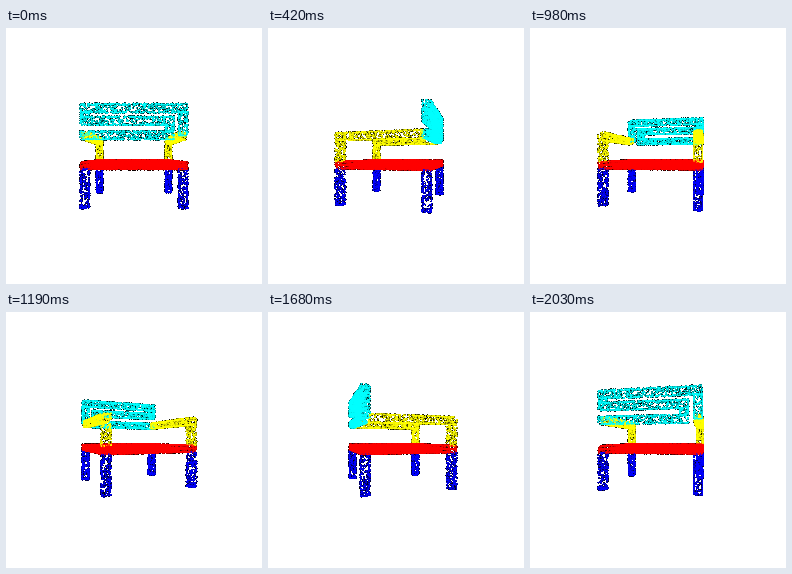
Write a matplotlib script that moves like this. It is 256x256 px and loops after 2100 ms.

```python
import numpy as np
import matplotlib.pyplot as plt
from matplotlib.animation import FuncAnimation

SIZE, FRAMES, INTERVAL = 256, 30, 70
CAMERA = 218.0      # distance to the axis of rotation, in pixels
RADIUS = 1.1        # splat radius
POINTS = 11500

BLUE, RED, YELLOW, CYAN = (0, 0, 1), (1, 0, 0), (1, 1, 0), (0, 1, 1)
HALF_W, HALF_D, HALF_H = 43.8, 41.5, 42.7
T = 3.3             # half thickness of the tube
LEG_X, LEG_Z = HALF_W - T, HALF_D - T
TOP, MID, LOW = -HALF_H + T, -29.0, -17.0
INNER = 29.5
SEAT_TOP, SEAT_MID, SEAT_LOW = 4.9, 7.9, 11.0

rng = np.random.default_rng(7)


def around(c):
    return c - T, c + T


def chair_boxes():
    """Yield (color, x range, y range, z range); y points down."""
    for y in ((SEAT_TOP, SEAT_MID), (SEAT_MID, SEAT_LOW)):
        yield RED, (-HALF_W, HALF_W), y, (-HALF_D, HALF_D)
    for side in (-1, 1):
        x = around(side * LEG_X)
        for z in (-LEG_Z, LEG_Z):
            yield BLUE, x, (SEAT_LOW, HALF_H), around(z)
        yield YELLOW, x, (LOW + T, SEAT_TOP), around(-LEG_Z)
        yield YELLOW, x, around(LOW), (-HALF_D, LEG_Z - T)
    # backrest: one tube folded into a spiral
    z = around(LEG_Z)
    yield CYAN, (-HALF_W, HALF_W), around(TOP), z
    yield CYAN, (-HALF_W, INNER + T), around(MID), z
    yield CYAN, (-HALF_W, INNER + T), around(LOW), z
    yield CYAN, around(LEG_X), (TOP + T, LOW), z
    yield CYAN, around(-LEG_X), (TOP + T, MID - T), z
    yield CYAN, around(INNER), (MID + T, LOW - T), z


def face_areas(lo, hi):
    a, b, c = hi - lo
    return np.array([b * c, a * c, a * b])


def sample_surface(lo, hi, n):
    areas = face_areas(lo, hi)
    pts = rng.uniform(lo, hi, (n, 3))
    axis = rng.choice(3, n, p=areas / areas.sum())
    end = rng.integers(0, 2, n)
    pts[np.arange(n), axis] = np.where(end, hi[axis], lo[axis])
    return pts


def build_cloud():
    boxes = [(color, *np.array(spans, float).T)
             for color, *spans in chair_boxes()]
    total = sum(face_areas(lo, hi).sum() for _, lo, hi in boxes)
    pts, colors = [], []
    for color, lo, hi in boxes:
        n = int(round(POINTS * face_areas(lo, hi).sum() / total))
        pts.append(sample_surface(lo, hi, n))
        colors.append(np.tile(np.array(color, float), (n, 1)))
    return np.vstack(pts), np.vstack(colors)


cloud, cloud_colors = build_cloud()
OFFSETS = [(dx, dy) for dy in (-1, 0, 1) for dx in (-1, 0, 1)]


def project(angle):
    x, y, z = cloud.T
    c, s = np.cos(angle), np.sin(angle)
    depth = z * c - x * s
    scale = 1 / (1 - depth / CAMERA)
    mid = (SIZE - 1) / 2
    return mid + (x * c + z * s) * scale, mid + y * scale, depth


def render(angle):
    """Composite soft discs front to back; uncovered pixels stay white."""
    u, v, depth = project(angle)
    order = np.argsort(-depth)
    u, v, colors = u[order], v[order], cloud_colors[order]
    cu, cv = np.rint(u).astype(int), np.rint(v).astype(int)

    pixel, weight, source = [], [], []
    for dx, dy in OFFSETS:
        px, py = cu + dx, cv + dy
        w = 1 - ((px - u) ** 2 + (py - v) ** 2) / RADIUS ** 2
        hit = np.flatnonzero(w > 0)
        pixel.append((py * SIZE + px)[hit])
        weight.append(w[hit])
        source.append(hit)
    pixel, weight, source = map(np.concatenate, (pixel, weight, source))

    order = np.lexsort((source, pixel))
    pixel, weight, source = pixel[order], weight[order], source[order]
    weight = np.minimum(weight, 0.9999)
    log_t = np.log1p(-weight)
    before = np.cumsum(log_t) - log_t
    _, first, inverse = np.unique(pixel, return_index=True,
                                  return_inverse=True)
    alpha = weight * np.exp(before - before[first][inverse])

    image = np.stack([np.bincount(pixel, alpha * colors[source, k], SIZE ** 2)
                      for k in range(3)], axis=1)
    image[np.bincount(pixel, minlength=SIZE ** 2) == 0] = 1
    return np.clip(image, 0, 1).reshape(SIZE, SIZE, 3)


fig = plt.figure(figsize=(2.56, 2.56), dpi=100, facecolor="white")
ax = fig.add_axes([0, 0, 1, 1])
ax.axis("off")
picture = ax.imshow(np.ones((SIZE, SIZE, 3)), interpolation="nearest",
                    aspect="auto")


def update(i):
    picture.set_data(render(2 * np.pi * i / FRAMES))
    return (picture,)


anim = FuncAnimation(fig, update, frames=FRAMES, interval=INTERVAL,
                     repeat=True, repeat_delay=0, blit=False)
plt.show()
```
